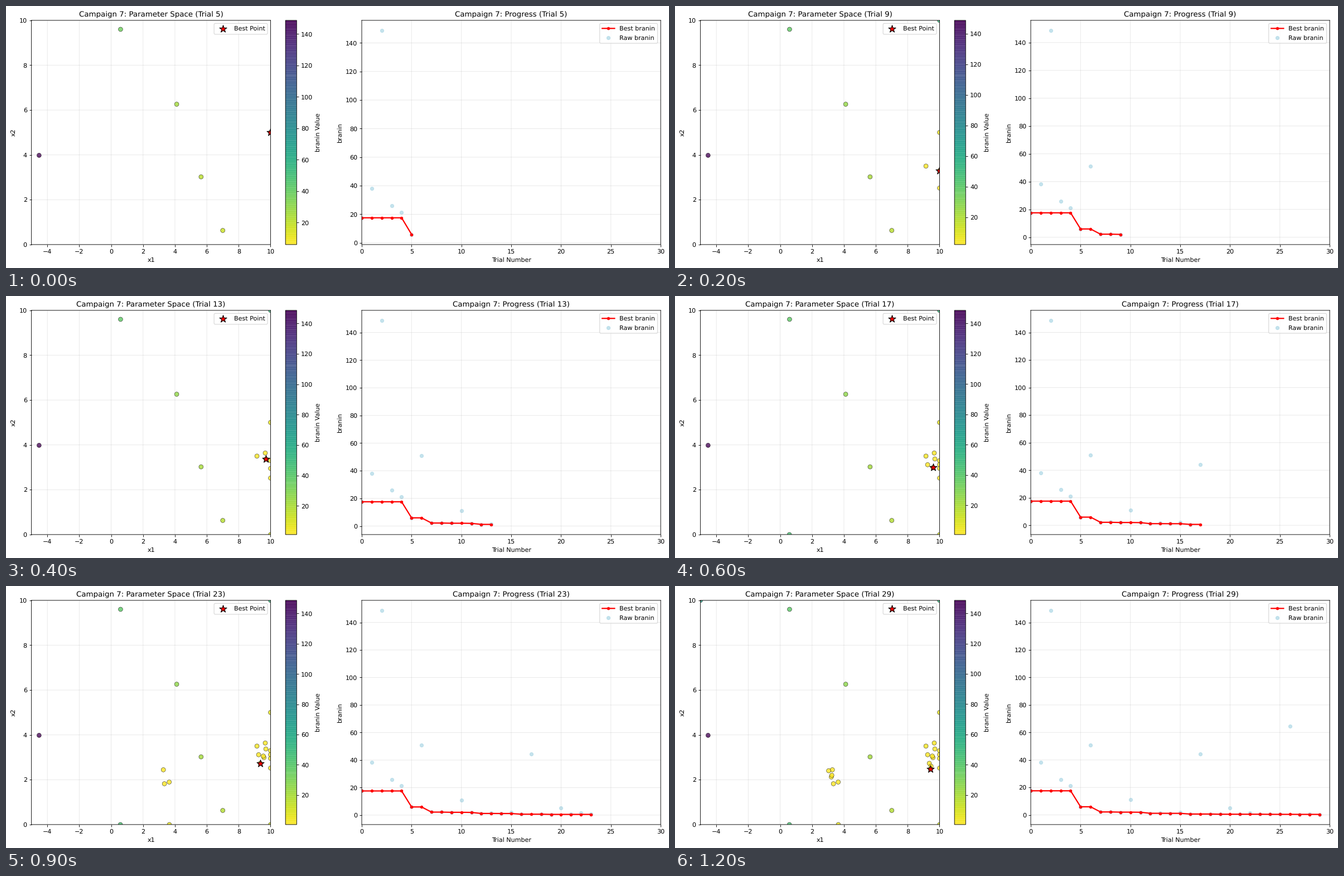
A matplotlib script that plays this animation: 1189x471 px, repeating every 1.3 s.

```python
import matplotlib.pyplot as plt
import numpy as np
from matplotlib.animation import FuncAnimation

WIDTH, HEIGHT, DPI = 1189, 471, 80
TOP, BOTTOM = 25.8, 428.9
FRAMES, INTERVAL = 13, 100
FIRST_TRIAL, TRIAL_STEP = 5, 2

# Soft, unsnapped edges and unhinted glyphs.
plt.rcParams.update({"path.snap": False, "text.hinting": "none"})


def branin(x1, x2):
    bowl = x2 - 5.1 / (4 * np.pi**2) * x1**2 + 5 / np.pi * x1 - 6
    return bowl**2 + 10 * (1 - 1 / (8 * np.pi)) * np.cos(x1) + 10


def approach_right(k):
    """Three-step zigzag closing in on the minimum near x1 = 3 pi."""
    fade, turn = 1 - k / 8, 2 * np.pi * k / 3
    return (3 * np.pi + fade * (0.12 - 0.4 * np.cos(turn)),
            2.475 + fade * (1.2 + 0.35 * np.cos(turn + 2 * np.pi / 3)))


def approach_left(k):
    """Four-step loop closing in on the minimum near x1 = pi."""
    fade, turn = 1 - k / 6, np.pi * k / 2
    return (np.pi + fade * (0.2 + 0.4 * np.sin(turn)),
            2.275 - fade * (0.1 + 0.5 * np.cos(turn - np.pi / 4)))


def sample_points():
    """The search: first samples, then edge probes and steps to two minima."""
    start = iter([(7, 0.63), (0.59, 9.6), (-4.52, 3.98), (4.11, 6.26), (5.64, 3.02)])
    edge = iter([(10, x2) for x2 in (5, 10, 2.52, 3.3, 0, 2.95, 3.12)])
    probe = iter([(0.58, 0), (3.65, 0), (-5, 10)])
    right = map(approach_right, range(9))
    left = map(approach_left, range(6))
    sources = {"s": start, "e": edge, "p": probe, "r": right, "l": left}
    order = "sssss" "eee" "r" "eee" "rrr" "e" "r" "p" "rr" "p" "lllll" "p" "rlr"
    return np.array([next(sources[key]) for key in order])


POINTS = sample_points()
VALUES = branin(*POINTS.T)
BEST = np.minimum.accumulate(VALUES)

fig = plt.figure(figsize=(WIDTH / DPI, HEIGHT / DPI), dpi=DPI, facecolor="white")


def add_panel(left, width):
    return fig.add_axes([left / WIDTH, 1 - BOTTOM / HEIGHT,
                         width / WIDTH, (BOTTOM - TOP) / HEIGHT])


def finish(ax, name, trial, **settings):
    ax.set(title=f"Campaign 7: {name} (Trial {trial})", **settings)
    ax.grid(alpha=0.3)
    ax.legend(loc="upper right")


def draw_space(trial):
    ax = add_panel(45.6, 428.9)
    points, values = POINTS[:trial + 1], VALUES[:trial + 1]
    dots = ax.scatter(*points.T, c=values, cmap="viridis_r", s=50, alpha=0.8,
                      edgecolors="black", linewidths=0.5)
    ax.scatter(*points[values.argmin()], c="red", s=150, marker="*",
               edgecolors="black", linewidths=1, label="Best Point")
    fig.colorbar(dots, cax=add_panel(501.2, 20.1), label="branin Value")
    finish(ax, "Parameter Space", trial, xlim=(-5, 10), ylim=(0, 10),
           xlabel="x1", ylabel="x2")


def draw_progress(trial):
    ax = add_panel(638, 536.1)
    trials = np.arange(trial + 1)
    ax.plot(trials, BEST[:trial + 1], "r-o", linewidth=2, markersize=4,
            label="Best branin")
    ax.scatter(trials, VALUES[:trial + 1], color="lightblue", s=30, alpha=0.7,
               label="Raw branin")
    finish(ax, "Progress", trial, xlim=(0, 30), xlabel="Trial Number",
           ylabel="branin")


def draw(frame):
    fig.clear()
    trial = FIRST_TRIAL + TRIAL_STEP * frame
    draw_space(trial)
    draw_progress(trial)


anim = FuncAnimation(fig, draw, frames=FRAMES, interval=INTERVAL, repeat=True,
                     repeat_delay=0)
plt.show()
```
